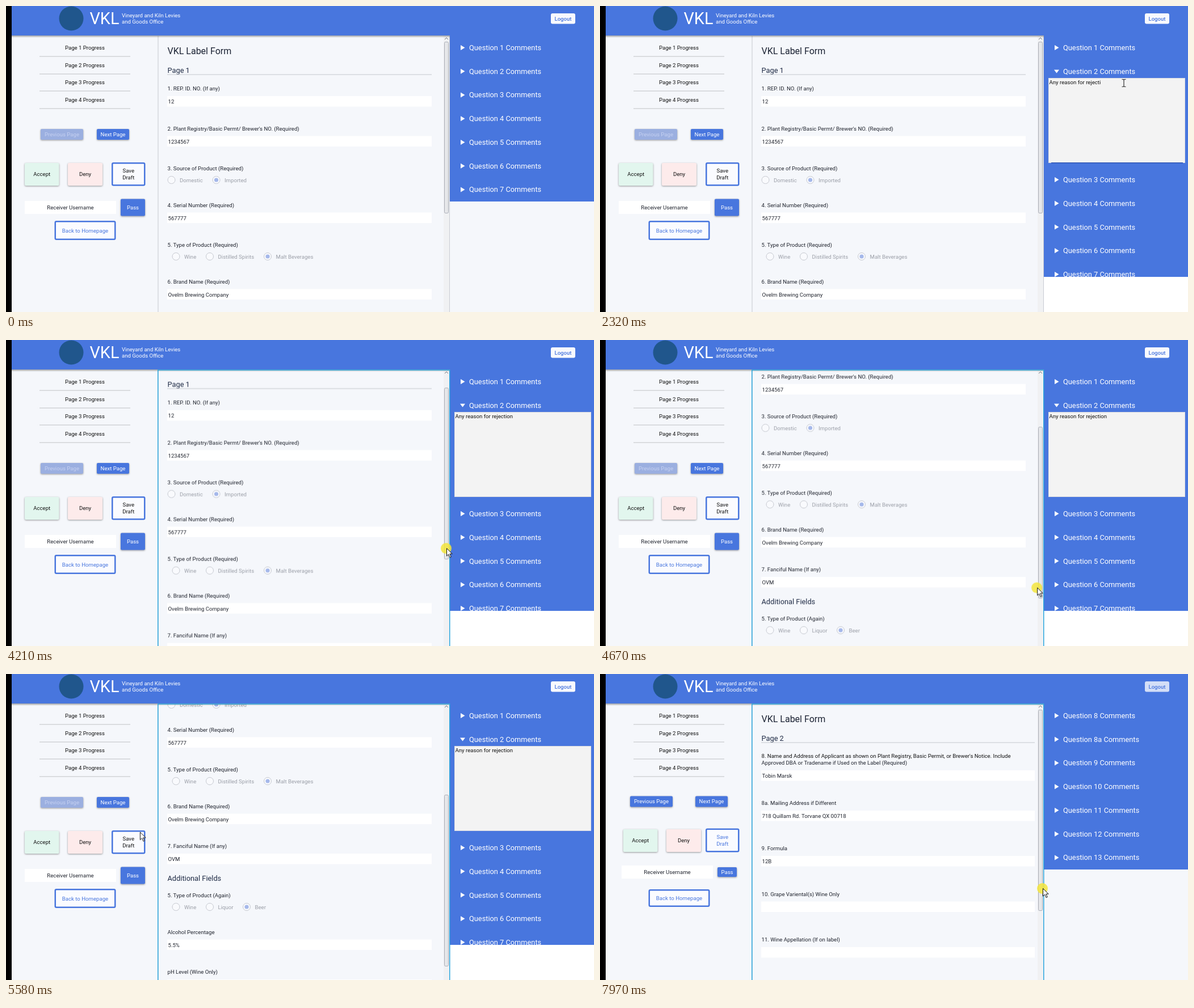
Animation, 1036 px wide and 540 px high, one loop 8000 ms. Source, as an HTML page:

```html
<!DOCTYPE html>
<html lang="en">
<head>
<meta charset="utf-8">
<title>Label form review</title>
<style>
html, body { margin: 0; width: 100%; height: 100%; overflow: hidden; background: #f5f7fb; }
svg { display: block; width: 1036px; height: 540px; }
text { font: 9.6px Roboto, sans-serif; fill: #20242e; white-space: pre; }
.h1 { font-size: 16px; fill: #1b2233; }
.h2 { font-size: 12.8px; fill: #1f2b45; }
.brand { font-size: 28.8px; }
.q { font-size: 12.8px; }
.w { fill: #fff; }
.b { fill: #4876de; }
.bold { font-weight: 500; }
.dim { fill: #9b9fa8; }
.off { fill: #c6d1f1; }
.k { fill: #111; }
.mid { text-anchor: middle; }
.raised { filter: drop-shadow(0 1px 1.5px rgba(0, 0, 0, .4)); }
.key { fill-opacity: 0; animation: key 8s step-end infinite; }
@keyframes key { 0% { fill-opacity: 1; } 65% { fill-opacity: 0; } 100% { fill-opacity: 0; } }
</style>
</head>
<body>
<script>
const LOOP = 8000, BLUE = '#4876de';
const pct = t => t / LOOP * 100 + '%';
let css = '', count = 0;

function animate(frames, ease) {
  const name = 'a' + count++;
  css += `@keyframes ${name}{${frames}}`;
  return `animation:${name} ${LOOP}ms ${ease} infinite`;
}

// Visible only during the given [start, end] spans.
function during(spans, body) {
  let frames = '0%{opacity:0}';
  for (const [a, b] of spans) frames += `${pct(a)}{opacity:1}${pct(b)}{opacity:0}`;
  return `<g style="${animate(frames, 'step-end')}">${body}</g>`;
}

// Moves through [time, x, y, easing to the next point].
function move(points, body) {
  const frames = points.map(([t, x, y, ease = 'ease-in-out']) =>
    `${pct(t)}{transform:translate(${x}px,${y}px);animation-timing-function:${ease}}`).join('');
  return `<g style="${animate(frames, 'linear')}">${body}</g>`;
}

const text = (x, y, str, cls = '') => `<text x="${x}" y="${y}" class="${cls}">${str}</text>`;
const rect = (x, y, w, h, fill, more = '') =>
  `<rect x="${x}" y="${y}" width="${w}" height="${h}" fill="${fill}" ${more}/>`;
const path = (d, fill, more = '') => `<path d="${d}" fill="${fill}" ${more}/>`;

function button(x, y, w, h, label, fill = BLUE, cls = 'w') {
  return rect(x, y, w, h, fill, 'rx="2" class="raised"') +
    text(x + w / 2, Math.round(y + h / 2 + 3.3), label, 'mid ' + cls);
}
function outlined(x, y, w, h, lines, cls) {
  const top = y + h / 2 + 3.5 - (lines.length - 1) * 6;
  return rect(x + 1.25, y + 1.25, w - 2.5, h - 2.5, '#fafbff', `stroke="${BLUE}" stroke-width="2.5" rx="2"`) +
    lines.map((s, i) => text(x + w / 2, Math.round(top + i * 12), s, 'mid ' + cls)).join('');
}

function header() {
  return rect(10, 0, 1026, 52, BLUE) + rect(10, 52, 772, 4, 'url(#shade)') +
    '<circle cx="115" cy="22" r="21.5" fill="#20568c"/>' +
    text(147.5, 32, 'VKL', 'brand w') +
    text(204, 20, 'Vineyard and Kiln Levies', 'w') + text(204, 31, 'and Goods Office', 'w');
}
const logout = fill => rect(960, 13, 43, 18.5, fill, 'rx="3"') + text(981.5, 26, 'Logout', 'mid b bold');

function progress() {
  return [1, 2, 3, 4].map((n, i) => text(139, Math.round(77 + i * 30.6), `Page ${n} Progress`, 'mid k') +
    rect(59, Math.round(88 + i * 30.7), 160, 2, '#dadcdf')).join('');
}

function sideOne() {
  return button(61, 217, 75, 19, 'Previous Page', '#9bafe0', 'off') +
    button(160, 217, 57, 19, 'Next Page') +
    during([[5800, 6000]], button(160, 217, 57, 19, 'Next Page', '#17398e')) +
    button(33, 277, 60.5, 40, 'Accept', '#e2f6ee', 'k') + button(109, 277, 61, 40, 'Deny', '#fdebeb', 'k') +
    outlined(186, 276, 59.5, 41.5, ['Save', 'Draft'], 'k') +
    rect(33, 344, 161, 23, '#fff') + text(113.5, 359, 'Receiver Username', 'mid') +
    button(202, 340.5, 43, 30, 'Pass') + outlined(85.5, 379, 108, 34, ['Back to Homepage'], 'b');
}
function sideTwo() {
  return button(53, 215.5, 75, 19, 'Previous Page') + button(168, 215.5, 57, 19, 'Next Page') +
    during([[6000, 6680]], button(168, 215.5, 57, 19, 'Next Page', '#17398e')) +
    button(41, 274, 60.5, 40, 'Accept', '#e2f6ee', 'k') + button(117, 274, 61, 40, 'Deny', '#fdebeb', 'k') +
    outlined(186, 272.5, 59.5, 42, ['Save', 'Draft'], 'b') +
    rect(38, 338, 161, 23, '#fff') + text(118.5, 353, 'Receiver Username', 'mid') +
    button(207, 341, 34, 17, 'Pass') + outlined(85.5, 380, 108, 31, ['Back to Homepage'], 'b');
}

const field = (y, label, value, w) =>
  text(284.5, y, label) + rect(284, y + 10, w, 18.5, '#fff') + text(285.5, y + 23, value);

function radios(y, label, options) {
  return text(284.5, y, label) + options.map(([x, name, on]) =>
    `<circle cx="${x}" cy="${y + 17}" r="6.5" fill="#f9fafd" stroke="#c5c8cf"/>` +
    (on ? `<circle cx="${x}" cy="${y + 17}" r="3.6" fill="#a5b8ea"/>` : '') +
    text(x + 14.5, y + 20.5, name, 'dim')).join('');
}
const title = (n, w) => text(284.5, 84.5, 'VKL Label Form', 'h1') + text(284.5, 117.5, 'Page ' + n, 'h2') +
  rect(284, 120.5, w, 1, '#c4c7cd');

function formOne() {
  const w = 466;
  return title(1, w) +
    field(149, '1. REP. ID. NO. (If any)', '12', w) +
    field(219.5, "2. Plant Registry/Basic Permt/ Brewer's NO. (Required)", '1234567', w) +
    radios(290, '3. Source of Product (Required)', [[291.5, 'Domestic'], [370.5, 'Imported', 1]]) +
    field(354.5, '4. Serial Number (Required)', '567777', w) +
    radios(425, '5. Type of Product (Required)',
      [[299.5, 'Wine'], [359, 'Distilled Spirits'], [461, 'Malt Beverages', 1]]) +
    field(489.5, '6. Brand Name (Required)', 'Ovelm Brewing Company', w) +
    field(560, '7. Fanciful Name (If any)', 'OVM', w) +
    text(284.5, 618, 'Additional Fields', 'h2') +
    radios(647, '5. Type of Product (Again)', [[299.5, 'Wine'], [359, 'Liquor'], [424, 'Beer', 1]]) +
    field(711.5, 'Alcohol Percentage', '5.5%', w) + field(782, 'pH Level (Wine Only)', '', w);
}
function formTwo() {
  const w = 482;
  return title(2, w) +
    text(284.5, 148, "8. Name and Address of Applicant as shown on Plant Registry, Basic Permit, or Brewer's Notice. Include", 'k') +
    field(160, 'Approved DBA or Tradename if Used on the Label (Required)', 'Tobin Marsk', w) +
    field(231, '8a. Mailing Address if Different', '718 Quillam Rd. Torvane QX 00718', w) +
    field(311, '9. Formula', '12B', w) + field(391.5, '10. Grape Variental(s) Wine Only', '', w) +
    field(472, '11. Wine Appellation (If on label)', '', w);
}

const thumb = h => rect(772.5, 63.5, 7, h, '#e6e7ea', 'rx="2" stroke="#a9adb6"');
const track = () => rect(771, 53, 10, 487, '#f0f1f3') + rect(781, 53, 1, 487, '#c9ccd3') +
  path('M773 59l3-3l3 3', 'none', 'stroke="#70747c"');

const closed = y => path(`M801 ${y - 4.5}l7.5 4.5l-7.5 4.5z`, '#fff');
const question = (id, y, mark = closed(y)) => mark + text(816, Math.round(y + 4.5), `Question ${id} Comments`, 'q w');
const list = (ids, from = 0, shift = 0) =>
  ids.map((id, i) => question(id, 73.4 + (i + from) * 41.75 + shift)).join('');
const panel = h => rect(782, 52, 254, h, BLUE);

function openList() {
  const typed = [...'Any reason for rejection'].map((c, i) =>
    `<tspan class="key" style="animation-delay:${1335 + i * 45}ms">${c}</tspan>`).join('');
  return rect(782, 478, 254, 62, '#fff') + panel(426) + '<g clip-path="url(#list)">' + list([1]) +
    question(2, 115.2, path('M800 112.5h9l-4.5 6z', '#fff')) + list([3, 4, 5, 6, 7], 2, 149.6) + '</g>' +
    rect(790.5, 127.5, 240, 149, '#f3f3f3', 'stroke="#dcdde0"') +
    during([[1040, 3290]], rect(795, 276, 232, 1.5, '#3358b4')) +
    text(791.5, 138, typed, 'k');
}

// Dragging the thumb down by d pixels moves the form up by about 1.69 d.
const drag = [[0, 0, 'linear'], [3800, 0, 'ease-in'], [4210, 21, 'linear'], [5070, 150, 'linear'], [LOOP, 150, 'linear']];
const dragged = (k, body) => move(drag.map(([t, d, e]) => [t, 0, Math.round(d * k), e]), body);

function cursor() {
  const way = [
    [0, 1060, 2], [80, 1034, 8], [600, 925, 112], [880, 925, 112], [1060, 923, 136], [2480, 923, 136],
    [3000, 636, 426], [3350, 754, 352], [3650, 776, 346], [3800, 776, 346, 'ease-in'],
    [4210, 776, 367, 'linear'], [5070, 765, 497], [5120, 765, 497], [5700, 186, 258],
    [5850, 191, 222], [6620, 191, 222], [7330, 760, 424], [7440, 760, 424], [7780, 780, 378], [LOOP, 780, 378]];
  const spot = '<circle cx="-.5" cy=".5" r="9.5" fill="#f3e53c" fill-opacity=".85"/>';
  const arrow = path('M.5 .5v13.5l3.2-3l2.4 5.6l2.2-1l-2.4-5.4h4.3z', '#fff', 'stroke="#111"');
  const beam = path('M-3.5-6.5h2.5l1 1l1-1h2.5M0-5.5v11M-3.5 6.5h2.5l1-1l1 1h2.5', 'none', 'stroke="#333" stroke-width="1.2"');
  return move(way,
    during([[600, 680], [1080, 1150], [3700, 5110], [5880, 5980], [7800, LOOP]], spot) +
    during([[0, 1000], [2520, LOOP]], arrow) + during([[1000, 2520]], beam));
}

const one = body => during([[0, 6000]], body);
const two = body => during([[6000, LOOP]], body);

const scene = `<svg viewBox="0 0 1036 540">
<defs>
  <linearGradient id="shade" x2="0" y2="1"><stop stop-opacity=".35"/><stop offset="1" stop-opacity="0"/></linearGradient>
  <clipPath id="form">${rect(268, 53, 503, 487, '#000')}</clipPath>
  <clipPath id="list">${rect(782, 52, 254, 426, '#000')}</clipPath>
</defs>` +
  rect(0, 0, 1036, 540, '#f5f7fb') + rect(0, 0, 10, 540, '#000') +
  progress() + rect(267.5, 53, 1, 487, '#c6c9d0') + one(sideOne()) + two(sideTwo()) +
  '<g clip-path="url(#form)">' + one(dragged(-1.687, formOne())) + two(formTwo()) + '</g>' +
  track() + one(dragged(1, thumb(302))) + two(thumb(354)) +
  header() + one(logout('#f8f9fd')) + two(logout('#d3def7')) +
  during([[0, 650]], panel(293) + list([1, 2, 3, 4, 5, 6, 7])) +
  during([[650, 6000]], openList()) +
  two(panel(293) + list([8, '8a', 9, 10, 11, 12, 13])) +
  during([[3700, 6000], [7800, LOOP]], rect(267.75, 53, 514, 500, 'none', 'stroke="#2ba6de" stroke-width="1.5"')) +
  cursor() + '</svg>';

document.head.insertAdjacentHTML('beforeend', `<style>${css}</style>`);
document.body.insertAdjacentHTML('beforeend', scene);
</script>
</body>
</html>
```
